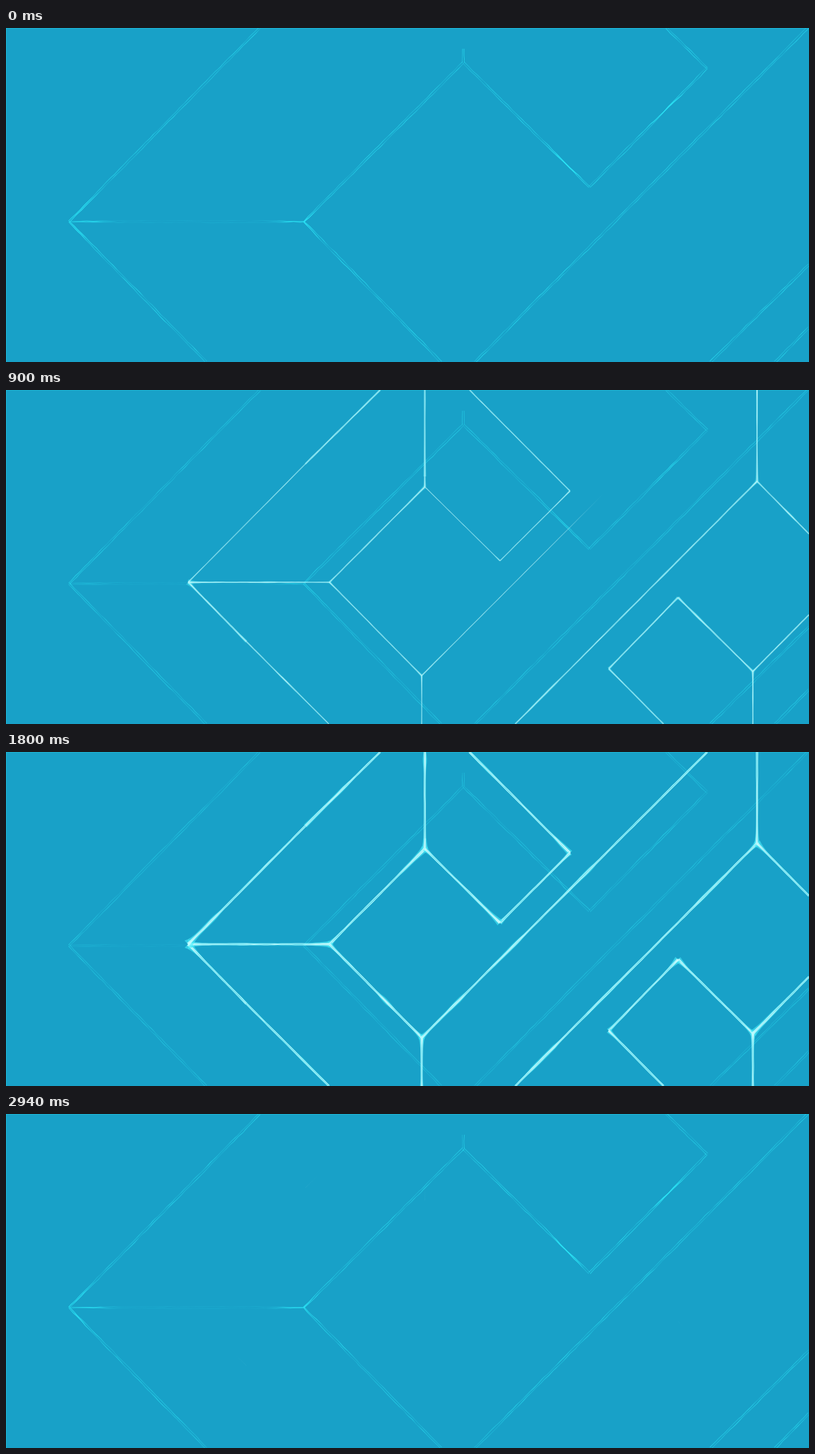
An HTML page with a canvas that plays this animation: 1159 by 483 pixels, repeating every 3000 ms.

```html
<!DOCTYPE html>
<html lang="en">
<head>
<meta charset="utf-8">
<title>Energy lines</title>
<style>
  html, body { margin: 0; width: 100%; height: 100%; overflow: hidden; background: #18a1c8; }
  canvas { display: block; }
</style>
</head>
<body>
<canvas id="stage" width="1159" height="483"></canvas>
<script>
const ctx = document.getElementById('stage').getContext('2d');
const LOOP = 3000, STEP = 60;

const clamp = v => Math.max(0, Math.min(1, v));
const mix = (a, b, k) => a + (b - a) * k;

// Turns "x,y x,y ..." into segments that know their share of the whole path
function path(text) {
  const pts = text.split(' ').map(p => p.split(',').map(Number));
  const segs = pts.slice(1).map((b, i) => ({ a: pts[i], b, len: Math.hypot(b[0] - pts[i][0], b[1] - pts[i][1]) }));
  const total = segs.reduce((sum, s) => sum + s.len, 0);
  let run = 0;
  for (const s of segs) {
    s.from = run / total;
    s.to = (run += s.len) / total;
  }
  return segs;
}

// Steady cyan lines and the spots where they burn brighter
const dimSegs = [
  '366,0 91,280 289,483', '660,30 660,50 430,280 628,483',
  '660,50 842,230 1012,58 953,0', '1157,0 677,483', '1159,342 1017,483', '1159,433 1110,483',
].flatMap(path);
const link = path('91,280 430,280')[0];
const hotSpots = path('120,280 418,280 808,197 955,118').flatMap(s => [s.a, s.b]);

// White sparks spread along a path while the level rises from `low` to `high`
const spark = (low, high, text) =>
  path(text).map(s => ({ ...s, on: mix(low, high, s.from), full: mix(low, high, s.to) }));
const sparks = [
  spark(.02, .16, '432,107 540,0'),
  spark(.02, .16, '604.5,125 604.5,0'),
  spark(.02, .44, '347,364 263,278 467,278'),
  spark(.03, .38, '970,300 1078,407 1078,483'),
  spark(.1, .36, '1084,0 1084,132 735,483'),
  spark(.2, .3, '970,300 870,403 949,483'),
  spark(.3, .34, '1159,325 1078,407'),
  spark(.3, .34, '1159,208 1084,132'),
  spark(.3, .47, '604.5,125 604.5,140 467,278 600,413 600,483'),
  spark(.35, .6, '669,0 814,146 713,247 604.5,140'),
  spark(.36, .46, '347,364 466,483'),
  spark(.46, .5, '432,107 263,278'),
  spark(.5, .76, '600,413 1012,0'),
].flat();

// A joint glows more where more lines meet, and where they meet at a sharp angle
const joints = {};
for (const s of sparks) {
  for (const [p, q] of [[s.a, s.b], [s.b, s.a]]) {
    const j = joints[p] ||= { x: p[0], y: p[1], n: 0, dx: 0, dy: 0 };
    j.n++;
    j.dx += (q[0] - p[0]) / s.len;
    j.dy += (q[1] - p[1]) / s.len;
  }
}
const nodes = Object.values(joints)
  .map(j => ({ ...j, glow: Math.hypot(j.dx, j.dy) * .4 + (j.n - 2) * .6 }))
  .filter(j => j.glow > .1);

const jointGlow = (x, y) =>
  Math.max(...nodes.map(j => j.glow * Math.exp(-Math.hypot(x - j.x, y - j.y) / 9)));
const heat = (x, y) =>
  Math.max(...hotSpots.map(([hx, hy]) => Math.exp(-(((x - hx) ** 2 + (y - hy) ** 2) / 900))));
const levelAt = t => Math.min(1, t / 1350, (LOOP - t) / 1200);

function hash(n) {
  const s = Math.sin(n * 127.1) * 43758.5453;
  return s - Math.floor(s);
}

function noise(x, seed) {
  const i = Math.floor(x), f = x - i;
  return mix(hash(i + seed), hash(i + 1 + seed), f * f * (3 - 2 * f));
}

// Fills a strip along a segment; shape(p, d, x, y) gives its side offset, width and alpha
function ribbon({ a: [x0, y0], b: [x1, y1], len }, rgb, shape) {
  const n = Math.max(2, Math.ceil(len / 5));
  const nx = (y0 - y1) / len, ny = (x1 - x0) / len;
  const fill = ctx.createLinearGradient(x0, y0, x1, y1);
  const left = [], right = [];
  for (let i = 0; i <= n; i++) {
    const p = i / n, x = mix(x0, x1, p), y = mix(y0, y1, p);
    const [off, width, alpha] = shape(p, p * len, x, y);
    const l = off + width / 2, r = off - width / 2;
    left.push([x + nx * l, y + ny * l]);
    right.unshift([x + nx * r, y + ny * r]);
    fill.addColorStop(p, `rgba(${rgb},${clamp(alpha).toFixed(3)})`);
  }
  ctx.beginPath();
  left.concat(right).forEach(q => ctx.lineTo(...q));
  ctx.fillStyle = fill;
  ctx.fill();
}

function drawDim(seg, seed, power, burn) {
  for (const side of [-1, 1]) {
    const s = seed + side * 31;
    ribbon(seg, '42,228,246', (p, d, x, y) => {
      const hot = burn * heat(x, y);
      return [
        side * mix(1.3, .4, hot) + (noise(d / 9, s) - .5) * .9,
        .9 + .3 * hot,
        power * (.25 + .7 * noise(d / 13, s + 7)) + .6 * hot,
      ];
    });
  }
}

function drawSpark(seg, seed, level) {
  const strength = p => {
    const on = mix(seg.on, seg.full, p);
    return clamp((level - on) / (.85 - on)) ** 1.5;
  };
  if (!strength(0) && !strength(1)) return;
  const swell = d => noise(d / 38, seed) ** 5;

  ribbon(seg, '70,236,250', (p, d, x, y) => {
    const s = strength(p);
    return [0, s * (3 + 4 * swell(d) + 7 * jointGlow(x, y)), s * .6];
  });
  for (const side of [-1, 1]) {
    ribbon(seg, '208,255,255', (p, d, x, y) => {
      const s = strength(p);
      return [
        side * s * .8 + (noise(d / 16, seed + side * 9) - .5) * .5 * s,
        .7 + s * (.3 + .8 * swell(d) + 1.4 * jointGlow(x, y)),
        Math.min(1, s * 12) * (.25 + .45 * s + .2 * noise(d / 20, seed + side * 5)),
      ];
    });
  }
}

function draw(step) {
  const level = levelAt(step * STEP);
  const power = .8 - .25 * level, burn = 1 - .75 * level;
  const seed = i => step * 613 + i * 97;

  ctx.fillStyle = '#18a1c8';
  ctx.fillRect(0, 0, 1159, 483);
  ctx.fillStyle = 'rgba(38,215,235,.35)';
  ctx.fillRect(0, 0, 1159, 1);
  ctx.fillRect(0, 0, 1, 483);

  dimSegs.forEach((s, i) => drawDim(s, seed(i), power, burn));
  drawDim(link, seed(30), power * .2, burn);
  sparks.forEach((s, i) => drawSpark(s, seed(i + 50), level));
}

let shown = -1;
const start = performance.now();
function tick() {
  const step = Math.floor((performance.now() - start) % LOOP / STEP);
  if (step !== shown) draw(shown = step);
  requestAnimationFrame(tick);
}
tick();
</script>
</body>
</html>
```
